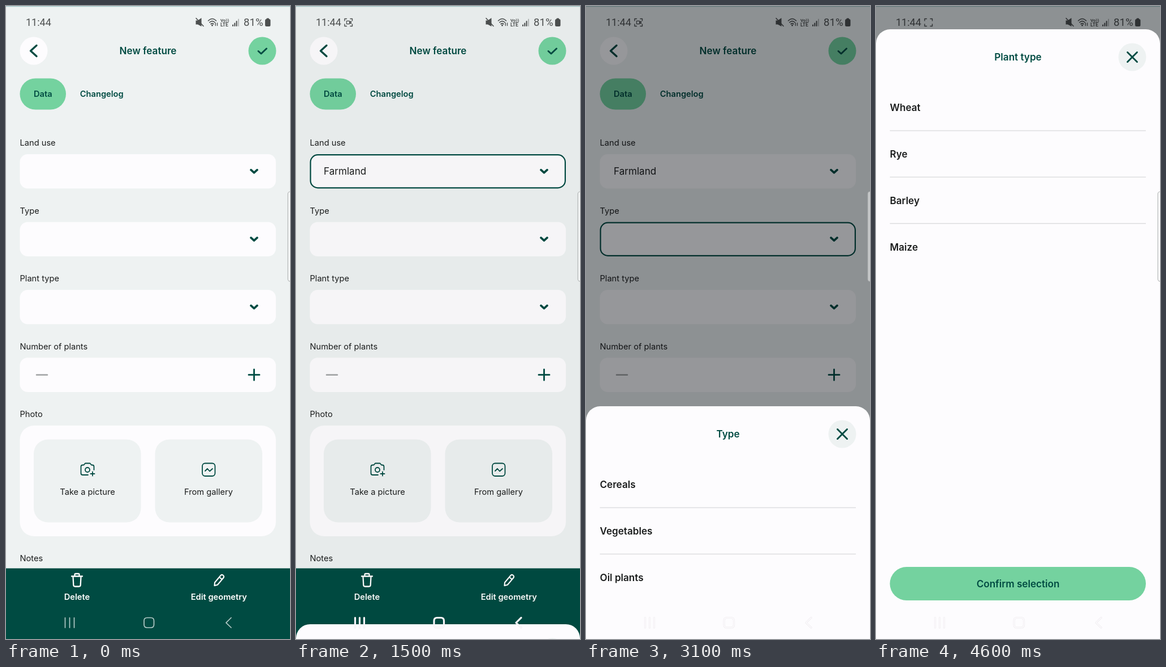
These frames come from a looping animation (502x1115 px, 5.1 s). An HTML page:

```html
<!DOCTYPE html>
<html lang="en">
<head>
<meta charset="utf-8">
<title>New feature form</title>
<style>
  html, body { margin: 0; width: 100%; height: 100%; overflow: hidden; background: #eef2f2; }
  svg { display: block; width: 100vw; height: 100vh; }
  text { font-family: Inter, sans-serif; font-size: 14.65px; fill: #1b1d1d; }
  .lg { font-size: 17.1px; }
  .sb { font-weight: 600; }
  .mid { text-anchor: middle; }
  .green { fill: #004b42; }
  .white { fill: #fff; }
  .status, .status text { font-family: Roboto, sans-serif; fill: #4d5050; }
  .line { fill: none; stroke: #004b42; stroke-linecap: round; stroke-linejoin: round; }
</style>
</head>
<body>
<svg id="stage" viewBox="0 0 502 1115" preserveAspectRatio="none" xmlns="http://www.w3.org/2000/svg"></svg>
<script>
const LOOP = 5100, STEP = 100;
const PAPER = '#fdfcfe', BG = '#eef2f2', MINT = '#74d29f', DARK = '#004b42';

const text = (s, x, y, cls = '') => `<text x="${x}" y="${y}" class="${cls}">${s}</text>`;
const box = (x, y, w, h, r, fill) =>
  `<rect x="${x}" y="${y}" width="${w}" height="${h}" rx="${r}" fill="${fill}"/>`;
const disc = (x, y, fill) => `<circle cx="${x}" cy="${y}" r="24.5" fill="${fill}"/>`;
const line = (d, w, color = DARK) =>
  `<path class="line" d="${d}" stroke-width="${w}" style="stroke:${color}"/>`;

const fields = [
  { label: 'Land use', y: 261 },
  { label: 'Type', y: 380.5 },
  { label: 'Plant type', y: 500 }
];

const sheets = [
  { title: 'Land use', top: 705, rows: ['Farmland', 'Orchard', 'Vineyard'],
    open: 350, rise: 250, close: 1250, focus: 200 },
  { title: 'Type', top: 705, rows: ['Cereals', 'Vegetables', 'Oil plants'],
    open: 2250, rise: 250, close: 3350, focus: 2100 },
  { title: 'Plant type', top: 41, rows: ['Wheat', 'Rye', 'Barley', 'Maize'],
    open: 4220, rise: 180, close: Infinity, focus: 4100, button: 'Confirm selection' }
];
const FALL = 350;

const touches = [
  { from: 100, to: 400, x: 60, y: 282 },
  { from: 1200, to: 1300, x: 62, y: 836 },
  { from: 2000, to: 2300, x: 52, y: 401 },
  { from: 3300, to: 3400, x: 60, y: 836 },
  { from: 4000, to: 4300, x: 68, y: 519 }
];

function statusBar() {
  const ink = '#4d5050';
  return `<g class="status">
    <text x="35" y="35" font-size="18" style="font-size:18px" textLength="">11:44</text>
    <text x="420" y="35" style="font-size:18.6px">81%</text>
    <g id="rec">
      ${line('M86 26V22.5H89.5M96 22.5H99.5V26M99.5 32V35.5H96M89.5 35.5H86V32', 1.4, ink)}
      <g id="cam">${line('M89.5 26.3H94.5V31.7H89.5ZM94.5 29L97.3 26.8V31.2Z', 1.3, ink)}</g>
    </g>
    <path d="M335.500 25.500H339L345.500 21V36L339 32.500H335.500Z"/>
    ${line('M336 21.500L349 35.500', 1.6, ink)}
    ${line('M357.5 26Q364.500 19 371.500 26M359.800 29Q364.500 24.400 369.200 29M362 31.800Q364.500 29.500 367 31.800', 1.6, ink)}
    <circle cx="364.500" cy="34" r="1.500"/>
    ${line('M370.300 34.500V30M373.500 30V34.500', 1.3, ink)}
    <text x="379" y="27.500" style="font-size:8px;font-weight:700">Vo))</text>
    <text x="379" y="36" style="font-size:8.500px;font-weight:700">LTE</text>
    ${line('M401 33.500V35M404.300 30.500V35M407.600 27V35', 2, ink)}
    ${line('M411 23.500V35', 2, '#b4b8b8')}
    ${box(458, 23, 9.5, 13, 2.5, ink)}${box(460.5, 21.5, 4.5, 3, 1, ink)}
  </g>`.replace(' textLength=""', '');
}

function header() {
  return disc(49, 79, PAPER) + line('M54 69.500L43.500 79L54 88.500', 3.4)
    + text('New feature', 251, 85, 'lg sb mid green')
    + disc(453, 79, MINT) + line('M446 79.500L451 84L460.500 75', 3)
    + box(24.5, 127.5, 81.5, 55, 27.5, MINT)
    + text('Data', 65.3, 160.2, 'sb mid green')
    + text('Changelog', 169.2, 160.2, 'sb mid green');
}

function field({ label, y }, i) {
  return text(label, 24.5, y - 15) + box(24.5, y, 452.5, 60.5, 14, PAPER)
    + `<rect id="focus${i}" x="25.600" y="${y + 1.1}" width="450.300" height="58.300" rx="13" fill="none" stroke="${DARK}" stroke-width="2.200"/>`
    + `<text id="value${i}" x="49" y="${y + 36.3}" class="lg"></text>`
    + line(`M433 ${y + 27.7}L438.500 ${y + 32.6}L444 ${y + 27.7}`, 3.8);
}

function form() {
  return fields.map(field).join('')
    + text('Number of plants', 24.5, 604.5) + box(24.5, 619.5, 452.5, 60.5, 14, PAPER)
    + line('M54 649.700H73', 2.5, '#a0a2a3') + line('M429 649.700H448M438.500 640.200V659.200', 2.8)
    + text('Photo', 24.5, 724) + box(24.5, 739, 452.5, 195, 25, PAPER)
    + box(49, 763.5, 189.5, 146, 25, BG) + box(263.5, 763.5, 189.5, 146, 25, BG)
    + line('M145 826H135.500Q132.500 826 132.500 823V811.500Q132.500 808.500 135.500 808.500H137.500L140 805.500H148.500L151 808.500H152.500Q155.500 808.500 155.500 811.500V817M149.500 824H156.500M153 820.500V827.500', 1.8)
    + `<circle class="line" cx="144" cy="817" r="4" stroke-width="1.800"/>`
    + text('Take a picture', 144, 861, 'mid')
    + `<rect class="line" x="347" y="805.500" width="22.500" height="22.500" rx="5" stroke-width="1.800"/>`
    + line('M352 819L356 815L360 819.500L365 815', 1.8)
    + text('From gallery', 358, 861, 'mid')
    + text('Notes', 24.5, 977.8);
}

function bottomBar() {
  return box(0, 990.5, 502, 124.5, 0, DARK)
    + line('M116 1004.500H135M121.500 1004V1001.500Q121.500 1000 123 1000H128Q129.500 1000 129.500 1001.500V1004M118.500 1005L119.300 1020Q119.500 1022.500 122 1022.500H129Q131.500 1022.500 131.700 1020L132.500 1005', 2.3, '#fff')
    + text('Delete', 125.5, 1046.2, 'sb mid white')
    + line('M368.500 1021L369 1015.500L379.500 1003Q381.500 1001 383.700 1002.800Q386 1004.800 384.500 1007L374 1019.500ZM377 1006L381.800 1010', 2.1, '#fff')
    + text('Edit geometry', 376.3, 1046.2, 'sb mid white');
}

const NAV = 'M104.500 1077.500V1095M112.500 1077.500V1095M120.500 1077.500V1095'
  + 'M249.500 1077.500H256Q261.500 1077.500 261.500 1083V1089.500Q261.500 1095 256 1095H249.500Q244 1095 244 1089.500V1083Q244 1077.500 249.500 1077.500Z'
  + 'M398 1077.500L389 1086.300L398 1095';

function sheet({ title, top, rows, button }, i) {
  const list = rows.map((name, k) => {
    const y = 138 + k * 81.8;
    return text(name, 24.5, y + 6.2, 'lg sb')
      + (k < rows.length - 1 ? box(24.5, y + 39.8, 452.5, 1.6, 0, '#dfdfe2') : '');
  }).join('');
  return `<g id="sheet${i}">
    ${box(0, 0, 502, 1160, 25, PAPER)}
    ${text(title, 251, 55.2, 'lg sb mid green')}
    ${disc(453, 49, BG)}${line('M444.500 40.500L461.500 57.500M461.500 40.500L444.500 57.500', 2.9)}
    ${list}
    ${button ? box(24.5, 988 - top, 452.5, 59, 29.5, MINT) + text(button, 251, 1023.5 - top, 'lg sb mid green') : ''}
  </g>`;
}

document.getElementById('stage').innerHTML =
  box(0, 0, 502, 1115, 0, BG) + box(0, 0, 502, 1.3, 0, '#a3c8c8')
  + statusBar() + header() + form() + bottomBar()
  + `<g id="nav">${line(NAV, 1.7, '#b3cac7')}</g>`
  + '<rect id="dim" width="502" height="1115" fill="#04070a"/>'
  + sheets.map(sheet).join('')
  + `<g id="paleNav">${line(NAV, 3.2, '#f0edf0')}${line(NAV, 1.5, PAPER)}</g>`
  + '<rect x="498.300" y="327" width="14" height="158" rx="4" fill="#fff" fill-opacity=".5" stroke="#b2b5b5" stroke-width="1.200"/>'
  + `<circle id="touch" r="10.700" fill="#fff" fill-opacity=".6" stroke="#cfdde0" stroke-width="1.400"/>`;

const $ = id => document.getElementById(id);
const show = (id, on) => $(id).setAttribute('visibility', on ? 'visible' : 'hidden');
const clamp = v => Math.min(1, Math.max(0, v));
const easeOut = u => 1 - Math.pow(1 - u, 2.2);

function progress(s, t) {
  return t < s.close
    ? easeOut(clamp((t - s.open) / s.rise))
    : 1 - easeOut(clamp((t - s.close) / FALL));
}

function draw(t) {
  let shade = 0;
  const focused = sheets.filter(s => t >= s.focus).length - 1;
  sheets.forEach((s, i) => {
    const p = progress(s, t);
    shade = Math.max(shade, p);
    show('sheet' + i, p > 0);
    $('sheet' + i).setAttribute('transform', `translate(0 ${1115 - (1115 - s.top) * p})`);
    show('focus' + i, i === focused);
    $('value' + i).textContent = t >= s.close ? s.rows[0] : '';
  });
  $('dim').setAttribute('opacity', 0.41 * shade);
  show('nav', shade === 0);
  show('paleNav', shade > 0);

  show('rec', t >= 100);
  show('cam', t >= 100 && Math.floor((t - 100) / 500) % 2 === 0);

  const hit = touches.find(c => t >= c.from && t < c.to + STEP);
  show('touch', hit);
  if (hit) {
    $('touch').setAttribute('cx', hit.x);
    $('touch').setAttribute('cy', hit.y);
    $('touch').setAttribute('opacity', t < hit.to ? 1 : 0.2);
  }
}

const start = performance.now();
function tick() {
  const t = (performance.now() - start) % LOOP;
  draw(Math.floor(t / STEP) * STEP);
  requestAnimationFrame(tick);
}
tick();
</script>
</body>
</html>
```
